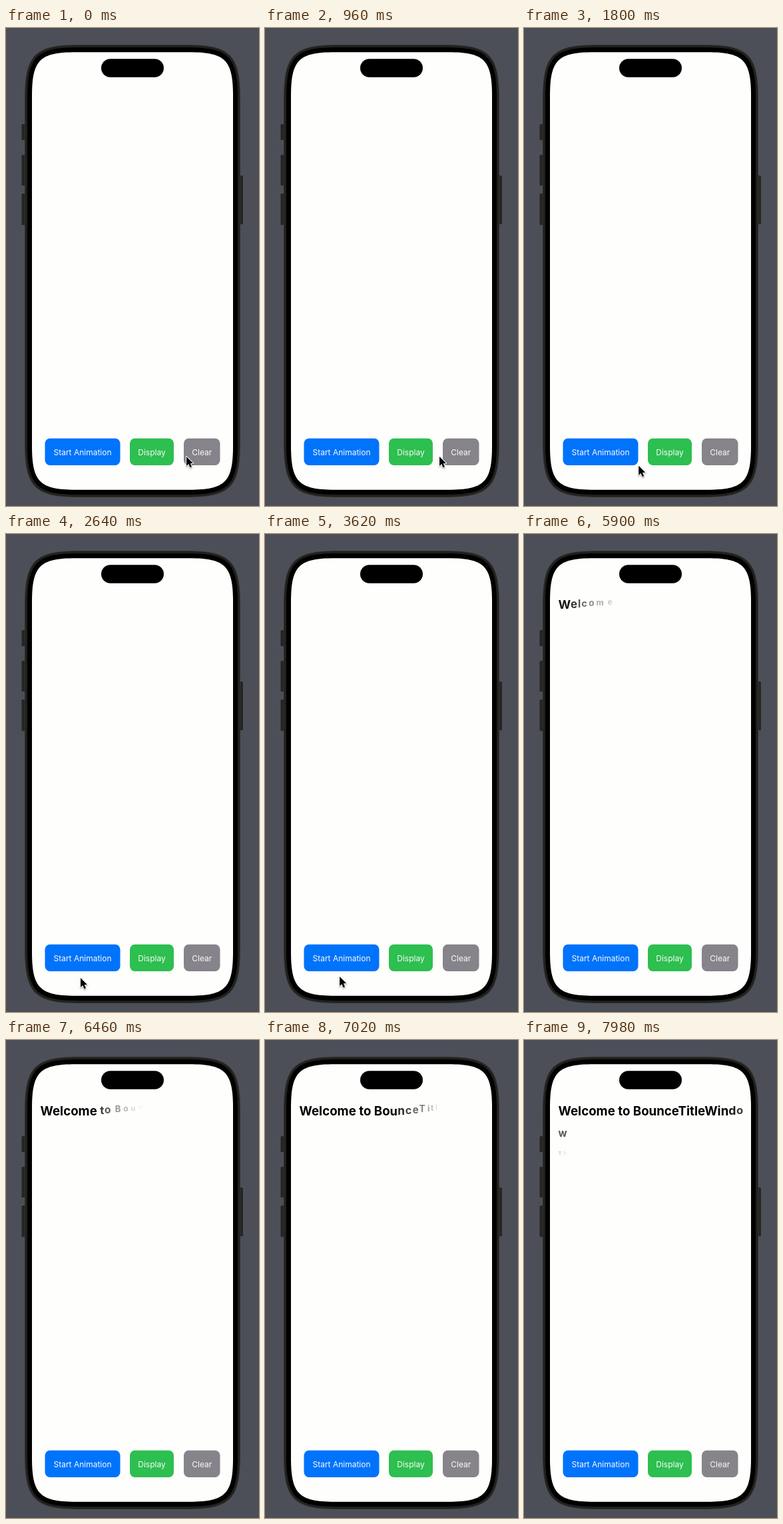
An HTML page with a canvas that plays this animation: 380 px wide and 716 px high, repeating every 8 s.

```html
<!DOCTYPE html>
<html lang="en">
<head>
<meta charset="utf-8">
<title>Letter by letter</title>
<style>
  html, body { margin: 0; width: 100%; height: 100%; overflow: hidden; background: #4c4f58; }
  canvas { display: block; width: 380px; height: 716px; }
</style>
</head>
<body>
<canvas id="stage"></canvas>
<script>
const W = 380, H = 716, LOOP = 8000;
const FONT = 'Inter, "Open Sans", sans-serif';
const canvas = document.getElementById('stage');
const ctx = canvas.getContext('2d');
const ratio = window.devicePixelRatio || 1;
canvas.width = W * ratio;
canvas.height = H * ratio;

// Letters appear one after another, each growing from its top left corner.
const FIRST = 5255, STEP = 84, GROW = 700;
const LINES = [
  { text: 'Welcome to BounceTitleWindo', index: 0, top: 95, size: 18.7, weight: 700 },
  { text: 'w', index: 27, top: 130, size: 18.7, weight: 700 },
  { text: 'This', index: 30, top: 165, size: 12, weight: 400 }
];

const BUTTONS = [
  { label: 'Start Animation', x: 58.5, w: 113, fill: '#0073fb' },
  { label: 'Display', x: 186, w: 66, fill: '#2dbf4f' },
  { label: 'Clear', x: 267, w: 54.5, fill: '#86848a' }
];

// Pointer stops: time, x, y
const POINTER = [
  [0, 271, 642], [700, 271, 642], [960, 262, 642], [1150, 250, 644],
  [2350, 112, 665], [3500, 112, 665], [4250, 114, 637],
  [5400, 114, 637], [5850, 116, 720]
];
const ARROW = [[0, 0], [0, 14], [3.2, 11.1], [5.6, 16.4], [8, 15.3], [5.7, 10.2], [10, 10]];

const clamp = v => Math.min(1, Math.max(0, v));
const ease = v => v * v * (3 - 2 * v);

function box(x, y, w, h, r, fill) {
  ctx.fillStyle = fill;
  ctx.beginPath();
  ctx.roundRect(x, y, w, h, r);
  ctx.fill();
}

// Rounded rectangle with corners that blend smoothly into the sides
function smoothBox(x, y, w, h, r, fill) {
  const e = r * 1.528, c = r * 0.272, R = x + w, B = y + h;
  ctx.beginPath();
  ctx.moveTo(x + e, y);
  ctx.lineTo(R - e, y);
  ctx.bezierCurveTo(R - c, y, R, y + c, R, y + e);
  ctx.lineTo(R, B - e);
  ctx.bezierCurveTo(R, B - c, R - c, B, R - e, B);
  ctx.lineTo(x + e, B);
  ctx.bezierCurveTo(x + c, B, x, B - c, x, B - e);
  ctx.lineTo(x, y + e);
  ctx.bezierCurveTo(x, y + c, x + c, y, x + e, y);
  ctx.fillStyle = fill;
  ctx.fill();
}

function drawPhone() {
  ctx.fillStyle = '#4c4f58';
  ctx.fillRect(0, 0, W, H);
  for (const [y, h] of [[144, 24], [190, 46], [248, 47]]) box(23.5, y, 6, h, 1.5, '#252522');
  box(350, 221, 6, 73, 1.5, '#252522');
  smoothBox(28, 25, 324, 678, 54, '#30302d');
  smoothBox(29, 26, 322, 676, 53, '#20201d');
  smoothBox(32, 29, 316, 670, 50, '#000');
  smoothBox(39, 36.3, 302, 655.4, 43, '#fefefd');
  box(143, 46.3, 94, 27.5, 13.75, '#000');
}

function drawButtons() {
  ctx.font = `400 12px ${FONT}`;
  ctx.textAlign = 'center';
  for (const b of BUTTONS) {
    box(b.x, 614.8, b.w, 40.2, 7.5, b.fill);
    ctx.fillStyle = '#fafafa';
    ctx.fillText(b.label, b.x + b.w / 2, 639.5);
  }
  ctx.textAlign = 'left';
}

function drawLine(line, t) {
  ctx.font = `${line.weight} ${line.size}px ${FONT}`;
  ctx.fillStyle = '#000';
  [...line.text].forEach((ch, i) => {
    const p = clamp((t - FIRST - (line.index + i) * STEP) / GROW);
    if (!p) return;
    const left = ctx.measureText(line.text.slice(0, i + 1)).width - ctx.measureText(ch).width;
    const scale = 0.5 + 0.5 * p;
    ctx.save();
    ctx.globalAlpha = p;
    ctx.translate(51.5 + left, line.top);
    ctx.scale(scale, scale);
    ctx.fillText(ch, 0, line.size * 0.97);
    ctx.restore();
  });
}

function drawPointer(t) {
  const next = POINTER.findIndex(stop => stop[0] > t);
  if (next < 1) return;
  const [t0, x0, y0] = POINTER[next - 1], [t1, x1, y1] = POINTER[next];
  const p = ease((t - t0) / (t1 - t0));
  ctx.save();
  ctx.translate(x0 + (x1 - x0) * p, y0 + (y1 - y0) * p);
  ctx.beginPath();
  for (const [x, y] of ARROW) ctx.lineTo(x, y);
  ctx.closePath();
  ctx.lineJoin = 'round';
  ctx.lineWidth = 2;
  ctx.strokeStyle = '#fff';
  ctx.shadowColor = 'rgba(0, 0, 0, 0.4)';
  ctx.shadowBlur = 2 * ratio;
  ctx.shadowOffsetY = ratio;
  ctx.stroke();
  ctx.shadowColor = 'transparent';
  ctx.fillStyle = '#000';
  ctx.fill();
  ctx.restore();
}

const start = performance.now();
function frame() {
  const t = (performance.now() - start) % LOOP;
  ctx.setTransform(ratio, 0, 0, ratio, 0, 0);
  drawPhone();
  for (const line of LINES) drawLine(line, t);
  drawButtons();
  drawPointer(t);
  requestAnimationFrame(frame);
}
frame();
</script>
</body>
</html>
```
